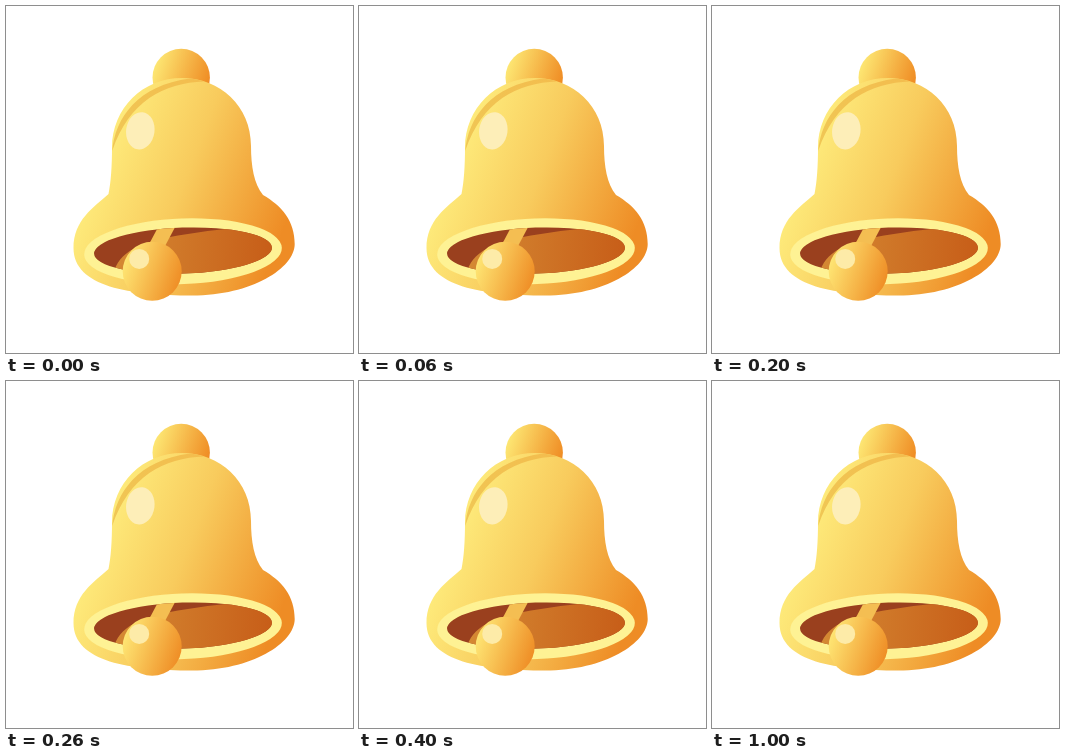
Recreate the animation shown at these times as an HTML page. Size 347x347 px, loop 1400 ms.

```html
<!DOCTYPE html>
<html lang="en">
<head>
<meta charset="utf-8">
<title>Ringing bell</title>
<style>
  html, body { margin: 0; width: 100%; height: 100%; overflow: hidden; background: #fff; }
  svg { display: block; width: 100vw; height: 100vh; }
  #bell { transform-box: view-box; transform-origin: 175px 71.5px; }
</style>
</head>
<body>
<svg viewBox="0 0 347 347">
  <defs>
    <linearGradient id="gold" gradientUnits="userSpaceOnUse" x1="92" y1="150" x2="278" y2="222">
      <stop offset="0" stop-color="#feec7c"/>
      <stop offset=".45" stop-color="#f8cb5d"/>
      <stop offset="1" stop-color="#ee8c25"/>
    </linearGradient>
    <linearGradient id="knobFill" gradientUnits="userSpaceOnUse" x1="148" y1="62" x2="203" y2="80">
      <stop offset="0" stop-color="#fde773"/>
      <stop offset="1" stop-color="#ef8a22"/>
    </linearGradient>
    <linearGradient id="ballFill" gradientUnits="userSpaceOnUse" x1="118" y1="256" x2="174" y2="275">
      <stop offset="0" stop-color="#fee573"/>
      <stop offset="1" stop-color="#ef8e26"/>
    </linearGradient>
    <linearGradient id="innerFill" gradientUnits="userSpaceOnUse" x1="107" y1="245" x2="267" y2="255">
      <stop offset="0" stop-color="#d58a34"/>
      <stop offset="1" stop-color="#c75d18"/>
    </linearGradient>
    <linearGradient id="bandFill" gradientUnits="userSpaceOnUse" x1="107" y1="140" x2="195" y2="74">
      <stop offset="0" stop-color="#f0c755"/>
      <stop offset="1" stop-color="#f3bd4e"/>
    </linearGradient>
    <clipPath id="mouth">
      <ellipse cx="177" cy="244.6" rx="89" ry="23" transform="rotate(-2 177 244.6)"/>
    </clipPath>
  </defs>

  <g id="bell">
    <circle cx="175.2" cy="71.5" r="28.7" fill="url(#knobFill)"/>
    <path fill="url(#gold)" d="M106 142C106 102 137 72 176 72C214 72 245 100 245 140
      C245 160 248 178 257 189C276 200 288.700 215 288.700 238C288.700 262 246 289.500 186 289.500
      C125 289.500 67.500 281 67.500 242C67.500 214 88 201 102.500 188C105 176 106 160 106 142Z"/>
    <path fill="url(#bandFill)" d="M106.200 145C109 112 132 79 184 72.500Q191 73 198 75.500
      C158 77 123 95 106.200 145Z"/>
    <ellipse cx="134.300" cy="124.800" rx="14.200" ry="18.700" fill="#fdeeb8" transform="rotate(8 134.300 124.800)"/>

    <ellipse cx="177" cy="245.200" rx="98.900" ry="32.800" fill="#fef294" transform="rotate(-2 177 245.200)"/>
    <g clip-path="url(#mouth)">
      <rect x="80" y="215" width="200" height="60" fill="#9a401e"/>
      <path fill="url(#innerFill)" d="M107 275C107 248 132 236 172 229.500Q205 224 238 221L280 215V280H107Z"/>
      <path d="M167 209L149 243" stroke="#f4be52" stroke-width="15"/>
    </g>
    <circle cx="146.200" cy="265.300" r="29.500" fill="url(#ballFill)"/>
    <circle cx="133.200" cy="252.900" r="10" fill="#fdeba8"/>
  </g>
</svg>
<script>
  const LOOP = 1400;
  // [start in ms, angle in degrees]; each pose holds until the next
  const poses = [[0, 0], [100, -22], [200, 0], [300, 24.6], [400, 0], [LOOP, 0]];

  const swing = document.getElementById("bell").animate(
    poses.map(([ms, deg]) => ({
      offset: ms / LOOP,
      transform: `rotate(${deg}deg)`,
      easing: "step-end"
    })),
    { duration: LOOP, iterations: Infinity }
  );
  swing.startTime = 0;
</script>
</body>
</html>
```
